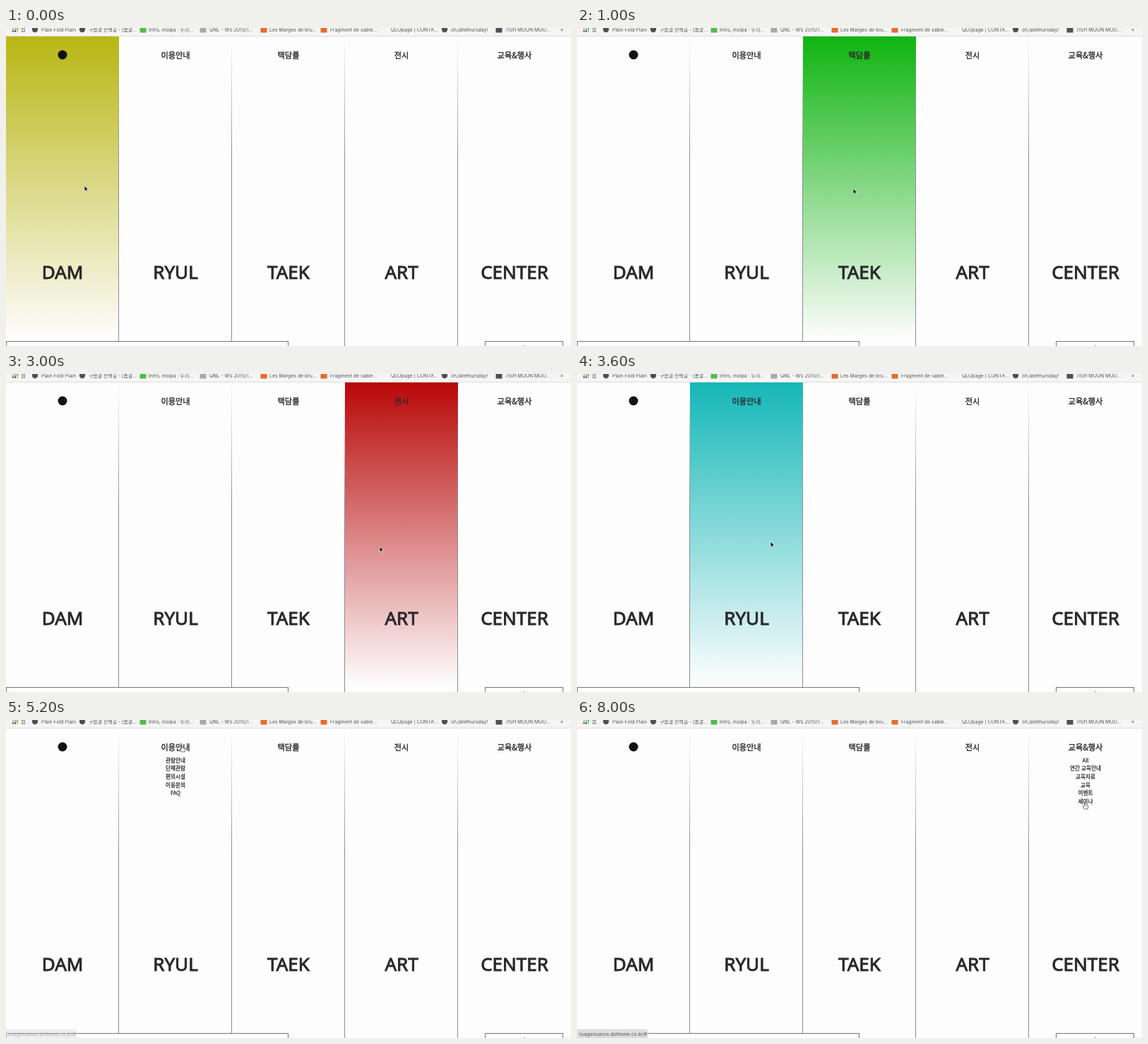
Write an HTML page that moves like this. It is 800 px wide and 450 px high and loops after 8.1 s.

```html
<!DOCTYPE html>
<html lang="ko">
<head>
<meta charset="utf-8">
<style>
html, body { margin: 0; width: 100%; height: 100%; overflow: hidden; background: #fefdfe; }
svg { display: block; width: 800px; height: 450px; }
text { font-family: "Noto Sans CJK KR", "Noto Sans CJK", sans-serif; fill: #2a282b; stroke: #2a282b; }
.word { font-family: "Noto Sans", sans-serif; font-size: 26px; stroke-width: 0.95px; text-anchor: middle; }
.head { font-size: 11.2px; stroke-width: 0.35px; text-anchor: middle; }
.sub { font-size: 7.6px; stroke-width: 0.25px; text-anchor: middle; }
.mark { font: 6.9px Inter, "Noto Sans CJK KR", "Noto Sans CJK", sans-serif; fill: #505052; stroke: none; }
.link { font: 6.6px Inter, sans-serif; fill: #505052; stroke: none; }
</style>
</head>
<body>
<svg id="stage" viewBox="0 0 800 450" xmlns="http://www.w3.org/2000/svg"></svg>
<script>
const LOOP = 8100, STEP = 100, COL = 160, TOP = 12, MENU_BOTTOM = 126;
const colors = ['#b8b613', '#16b7b7', '#10b410', '#b80808', '#1010b8'];
const columns = [
  { word: 'DAM', subs: [] },
  { word: 'RYUL', head: '이용안내', subs: ['관람안내', '단체관람', '편의시설', '이용문의', 'FAQ'] },
  { word: 'TAEK', head: '택담률', subs: [] },
  { word: 'ART', head: '전시', subs: [] },
  { word: 'CENTER', head: '교육&행사',
    subs: ['All', '연간 교육안내', '교육자료', '교육', '이벤트', '세미나'] }
];
// [text x, label, icon centre, icon colour, round]
const bookmarks = [
  [21, '앱'],
  [50, 'Plain Fold Plain', 41, '#505054', true],
  [117, '구름결 산책길 - [봄결...', 108, '#505054', true],
  [202, 'Intro, molpa : 누리...', 194, '#4fbd45'],
  [288, 'QNL - WS 2015/1...', 279, '#aaa9aa'],
  [373, 'Les Marges de bru...', 365, '#e96a2c'],
  [459, 'Fragment de sable...', 450, '#e96a2c'],
  [545, 'QLOpage | CONTA...'],
  [630, 'oh,latethursday!', 621, '#505054', true],
  [707, '7ISH MOON MOO...', 698, '#505054'],
  [785, '»']
];
// pointer tip: [ms, x, y]
const path = [
  [0, 111, 223], [500, 210, 225], [900, 312, 227], [1000, 391, 227],
  [1400, 495, 233], [1800, 612, 238], [2000, 650, 240], [2300, 712, 243],
  [2600, 655, 245], [2700, 615, 245], [3000, 529, 244], [3300, 400, 240],
  [3600, 274, 237], [3900, 140, 228], [4100, 105, 222], [4500, 165, 170],
  [5000, 242, 50], [5200, 249, 36], [5700, 243, 95], [6000, 252, 40],
  [6400, 392, 36], [6800, 405, 38], [7100, 558, 36], [7500, 716, 38],
  [8000, 719, 117]
];
const stage = document.getElementById('stage');

function add(tag, attrs, parent = stage, content) {
  const el = document.createElementNS('http://www.w3.org/2000/svg', tag);
  for (const key in attrs) el.setAttribute(key, attrs[key]);
  if (content) el.textContent = content;
  parent.appendChild(el);
  return el;
}
const label = (cls, x, y, str, parent) => add('text', { class: cls, x, y }, parent, str);
const show = (el, on) => el.setAttribute('visibility', on ? 'visible' : 'hidden');

function fade(id, stops) {
  const g = add('linearGradient', { id, x1: 0, x2: 0, y1: TOP, y2: 450, gradientUnits: 'userSpaceOnUse' });
  stops.forEach(([offset, color, opacity]) =>
    add('stop', { offset, 'stop-color': color, 'stop-opacity': opacity }, g));
}

fade('rule', [[0, '#8c8b8e', 0], [0.4, '#8c8b8e', 1], [1, '#8c8b8e', 1]]);
columns.forEach((c, i) => {
  fade('fill' + i, [[0, colors[i], 1], [0.98, '#fefdfe', 1]]);
  c.glow = add('rect', { x: i * COL, y: TOP, width: COL, height: 450 - TOP, fill: `url(#fill${i})` });
});
columns.forEach((c, i) => {
  const mid = i * COL + COL / 2;
  if (i) add('rect', { x: i * COL - 1, y: TOP, width: 1, height: 450 - TOP, fill: 'url(#rule)' });
  if (c.head) label('head', mid, 43, c.head);
  else add('circle', { cx: mid, cy: 38, r: 6.5, fill: '#111' });
  label('word', mid, 355, c.word);
  c.menu = add('g', {});
  c.subs.forEach((s, k) => label('sub', mid, 59.8 + k * 11.65, s, c.menu));
});

// footer boxes
[[0.5, 399], [678.5, 110]].forEach(([x, width]) =>
  add('rect', { x, y: 443.5, width, height: 12, fill: '#fefdfe', stroke: '#777679' }));
add('rect', { x: 733, y: 449, width: 2, height: 1, fill: '#99989a' });

// bookmark bar
add('rect', { width: 800, height: 11, fill: '#f6f5f6' });
add('rect', { y: 11, width: 800, height: 1, fill: '#dddcdd' });
for (let k = 0; k < 6; k++)
  add('rect', { x: 9 + k % 3 * 3, y: 0.5 + Math.floor(k / 3) * 3, width: 2, height: 2, fill: colors[k % 5] });
bookmarks.forEach(([x, str, cx, fill, round]) => {
  label('mark', x, 4.8, str);
  if (round) add('circle', { cx, cy: 2, r: 4.2, fill });
  else if (fill) add('rect', { x: cx - 4.5, y: -3, width: 9, height: 9.5, fill });
});

const status = add('g', {});
add('path', { d: 'M0 438H97Q99.500 438 99.500 440.500V450H0Z', fill: '#dfdee1', stroke: '#cccbce', 'stroke-width': 0.6 }, status);
label('link', 3, 446.8, 'nuagenuance.dothome.co.kr/#', status);

const arrow = add('path', {
  d: 'M0 0V8L1.800 6.300L3 9L4.400 8.400L3.200 5.800H5.600Z',
  fill: '#111', stroke: '#fff', 'stroke-width': 0.7
});
const hand = add('path', {
  d: 'M-.8 .7Q0-.5 .8 .7V3.200L4.200 4Q5 4.300 4.800 5.600L4 9H-.7L-3 5.700Q-2.700 4.500-.8 5.600Z',
  fill: '#fff', stroke: '#333', 'stroke-width': 0.7
});

function pointer(t) {
  const n = Math.max(1, path.findIndex(p => p[0] >= t));
  const [t0, x0, y0] = path[n - 1], [t1, x1, y1] = path[n];
  const k = (t - t0) / (t1 - t0);
  return [x0 + (x1 - x0) * k, y0 + (y1 - y0) * k];
}

function draw(now) {
  const t = Math.floor(now % LOOP / STEP) * STEP;
  const [x, y] = pointer(t);
  const over = Math.floor(x / COL), inMenu = y < MENU_BOTTOM;
  columns.forEach((c, i) => {
    show(c.glow, i === over && !inMenu);
    show(c.menu, i === over && inMenu);
  });
  status.setAttribute('opacity', Math.min(1, Math.max(0, (t - 5000) / 400)));
  show(arrow, !inMenu);
  show(hand, inMenu);
  (inMenu ? hand : arrow).setAttribute('transform', `translate(${x} ${y})`);
}

const start = performance.now();
function tick() {
  draw(performance.now() - start);
  requestAnimationFrame(tick);
}
tick();
</script>
</body>
</html>
```
